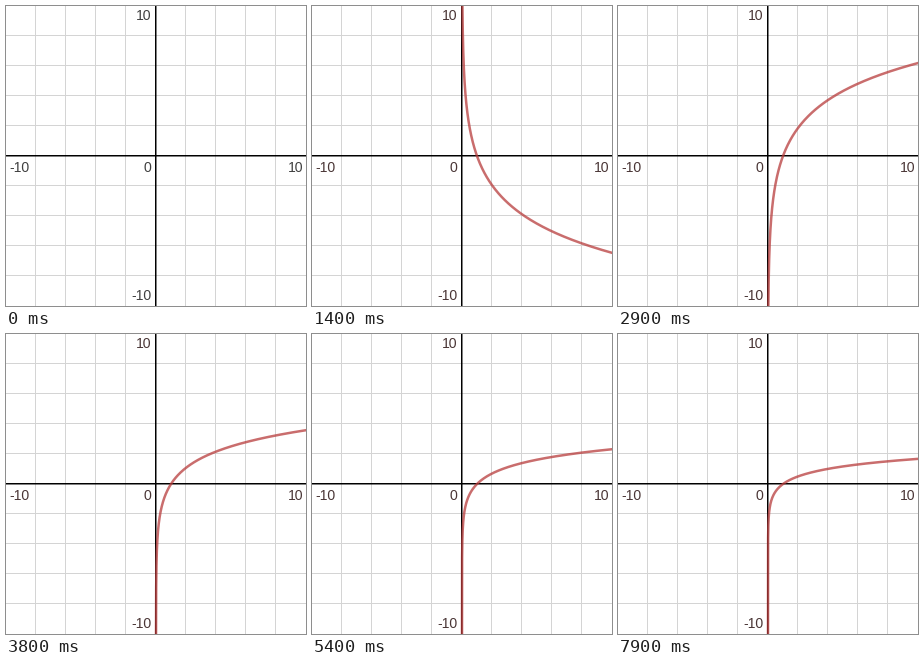
A matplotlib script that plays this animation: 300x300 px, repeating every 8000 ms.

```python
import numpy as np
import matplotlib.pyplot as plt
from matplotlib.animation import FuncAnimation

SIZE, DPI = 300, 100
FRAMES, INTERVAL = 80, 100
UNIT, CENTER = 15, 150        # pixels per unit, pixel position of zero
PX = 72 / DPI                 # points per pixel

plt.rcParams["font.family"] = "Liberation Sans"
fig = plt.figure(figsize=(SIZE / DPI, SIZE / DPI), dpi=DPI, facecolor="white")
ax = fig.add_axes([0, 0, 1, 1])
ax.set_xlim(0, SIZE)
ax.set_ylim(SIZE, 0)
ax.axis("off")


def cross(pos, color, width, z):
    """Draw a vertical and a horizontal line through one pixel position."""
    for xs, ys in (([pos, pos], [0, SIZE]), ([0, SIZE], [pos, pos])):
        ax.plot(xs, ys, color=color, lw=width * PX, zorder=z, snap=False,
                solid_capstyle="butt")


for k in range(1, 10):
    if k != 5:
        cross(30 * k - 0.5, "#d4d4d4", 1, 1)
cross(149.75, "black", 1.5, 2)

labels = [
    ax.text(x, y, s, ha=ha, va="baseline", fontsize=14 * PX, zorder=3)
    for x, y, s, ha in (
        (145.5, 14, "10", "right"),
        (145.5, 294, "-10", "right"),
        (145.5, 166, "0", "right"),
        (3, 166, "-10", "left"),
        (297.5, 166, "10", "right"),
    )
]

curve, = ax.plot([], [], color=(0.72, 0.235, 0.235), alpha=0.75, lw=2.5 * PX,
                 zorder=4, solid_joinstyle="round")

# Sampling evenly in ln(x) keeps the steep part near x = 0 smooth.
ln_x = np.linspace(-45, np.log(10.5), 2400)
curve_x = CENTER + UNIT * np.exp(ln_x)


def update(i):
    base = i / 20
    for label in labels:
        label.set_color("#4a3636" if i else "#404040")
    if i in (0, 20):          # log is undefined for base 0 and base 1
        curve.set_data([], [])
    else:
        y = CENTER - UNIT * ln_x / np.log(base)
        shown = (y > -400) & (y < SIZE + 400)
        curve.set_data(curve_x[shown], y[shown])
    return [curve, *labels]


anim = FuncAnimation(fig, update, frames=FRAMES, interval=INTERVAL,
                     repeat=True, repeat_delay=0, blit=False)
plt.show()
```
